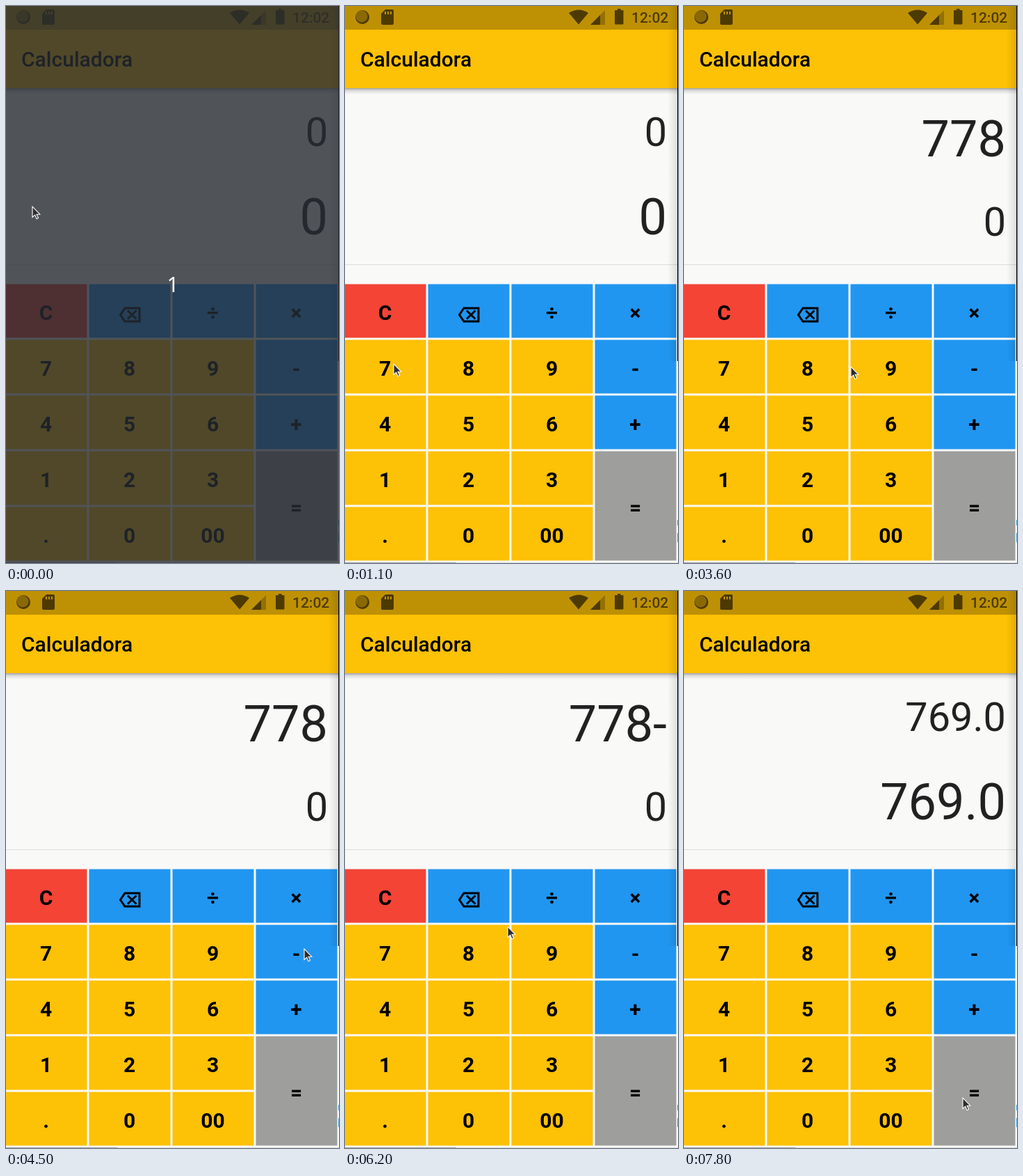
Animation, 479 px wide and 800 px high, one loop 8 s. Source, as an HTML page:

```html
<!DOCTYPE html>
<html lang="pt">
<head>
<meta charset="utf-8">
<title>Calculadora</title>
<style>
  html, body { margin: 0; width: 100%; height: 100%; overflow: hidden; background: #f9f9f8; }
  svg { display: block; width: 479px; height: 800px; }
  text { font-family: Roboto, "Liberation Sans", sans-serif; }
  .key { font-size: 30px; font-weight: 700; text-anchor: middle; }
  .num { fill: #212121; text-anchor: end; }
  .count { font: 30px "Noto Sans", sans-serif; fill: #fff; text-anchor: middle; }
  #veil { animation: veil 8s step-end infinite; }
  @keyframes veil { 0% { visibility: visible; } 1.25%, 100% { visibility: hidden; } }
</style>
</head>
<body>
<svg viewBox="0 0 479 800">
  <defs>
    <linearGradient id="barShade" x2="0" y2="1">
      <stop offset="0" stop-opacity=".34"/>
      <stop offset=".4" stop-opacity=".12"/>
      <stop offset="1" stop-opacity="0"/>
    </linearGradient>
    <linearGradient id="sideShade">
      <stop offset="0" stop-opacity="0"/>
      <stop offset="1" stop-opacity=".11"/>
    </linearGradient>
    <clipPath id="keyClip"><rect id="clipBox" width="117" height="77"/></clipPath>
  </defs>

  <rect width="479" height="800" fill="#f9f9f8"/>
  <rect y="118" width="478" height="9" fill="url(#barShade)"/>
  <rect width="478" height="118" fill="#fdc105"/>
  <rect width="478" height="34" fill="#be9104"/>

  <g fill="#4d3a02">
    <circle cx="25" cy="16" r="10"/>
    <circle cx="24" cy="15" r="8.500" fill="#8a6903"/>
    <path d="M58 5h10q2 0 2 2v18q0 2-2 2H54q-2 0-2-2V11z"/>
    <path d="M58 8v4M62 8v4M66 8v4" stroke="#be9104" stroke-width="2"/>
    <path d="M322 10Q336 1 350 10L336 26.500z"/>
    <path d="M353 27L374 6V27z" opacity=".38"/>
    <path d="M353 27L367 13V27z"/>
    <path d="M391.500 4h5v2h3q1 0 1 1V25q0 1.500-1.500 1.500h-9.500q-1.500 0-1.500-1.500V7q0-1 1-1h3.500z"/>
    <text x="412" y="24" font-size="21" font-weight="500">12:02</text>
  </g>

  <text x="22" y="87" font-size="30" font-weight="500">Calculadora</text>
  <text id="top" class="num" x="463"></text>
  <text id="low" class="num" x="463"></text>
  <path d="M0 371.500H478" stroke="#dcdcdb"/>

  <g id="keys"></g>
  <circle id="ripple" opacity=".13" clip-path="url(#keyClip)"/>
  <path d="M164.500 443.500L171 434H192V453H171z M175 437.500L187.500 449.500M187.500 437.500L175 449.500"
        fill="none" stroke="#000" stroke-width="3"/>

  <rect x="464" width="14" height="510" fill="url(#sideShade)"/>
  <rect x="478" width="1" height="510"/>
  <path d="M478.500 738v8M478.500 757v13" stroke="#4a9fd0"/>
  <path d="M0 799.500H160" stroke="#a5a5a5"/>
  <path d="M160 799.500H479" stroke="#dedede"/>

  <g id="veil">
    <rect width="479" height="800" fill="#262b32" opacity=".8"/>
    <text class="count" x="240" y="411">1</text>
  </g>

  <path id="cursor" d="M0 1V16.500L3.700 13.200L6.100 18.700L8.500 17.600L6.100 12.200H10.800z"
        fill="#2d2d2f" stroke="#fff" stroke-width="1.100"/>
</svg>

<script>
const LOOP = 8000, STEP = 100;
const $ = id => document.getElementById(id);

const YELLOW = '#fdc105', BLUE = '#2196f0', RED = '#f34436', GREY = '#9e9e9d';
const rows = ['C ÷×', '789-', '456+', '123='].map(r => [...r]);
rows.push(['.', '0', '00']);

const keyLeft = col => col * 120 - .5;
const keyTop = row => row * 80 + 399.5;

function keyColor(label, col) {
  if (label === 'C') return RED;
  if (label === '=') return GREY;
  return col === 3 || '÷ '.includes(label) ? BLUE : YELLOW;
}

$('keys').innerHTML = rows.map((row, r) => row.map((label, c) => {
  const height = label === '=' ? 157 : 77;
  return `<rect x="${keyLeft(c)}" y="${keyTop(r)}" width="117" height="${height}" fill="${keyColor(label, c)}"/>` +
    `<text class="key" x="${keyLeft(c) + 58}" y="${keyTop(r) + height / 2 + 13}">${label}</text>`;
}).join('')).join('');

// Pointer hops: start, end, and where the tip comes to rest
const home = { x: 38, y: 287 };
const hops = [
  [500, 700, 83, 476],
  [900, 1100, 70, 513],
  [1700, 1900, 76, 513],
  [2700, 3100, 196, 522],
  [3600, 3700, 284, 511],
  [3900, 4500, 429, 513],
  [5800, 6000, 249, 471],
  [6200, 6300, 218, 491],
  [6400, 6500, 273, 515],
  [6900, 7000, 342, 646],
  [7200, 7600, 401, 727]
];

// Key presses: time, label, how long the ripple shows
const presses = [
  [2100, '7', 100], [2200, '7', 0], [3300, '8', 100],
  [5300, '-', 300], [6700, '9', 200], [7800, '=', 0]
];

const smooth = p => p * p * (3 - 2 * p);

function pointer(t) {
  let { x, y } = home;
  for (const [start, end, toX, toY] of hops) {
    if (t < start) break;
    const p = smooth(Math.min(1, (t - start + STEP) / (end - start + STEP)));
    x += (toX - x) * p;
    y += (toY - y) * p;
  }
  return { x, y };
}

function display(t) {
  const typed = presses.filter(([at]) => at <= t).map(([, label]) => label).join('');
  if (!typed.endsWith('=')) return { expr: typed || '0', result: '0', typing: typed !== '' };
  const [a, b] = typed.slice(0, -1).split('-');
  const result = (a - b).toFixed(1);
  return { expr: result, result, typing: false };
}

function set(el, attrs) {
  for (const name in attrs) el.setAttribute(name, attrs[name]);
}

function drawNumber(el, text, big, y) {
  el.textContent = text;
  set(el, { 'font-size': big ? 72 : 57.6, y });
}

function drawRipple(t, { x, y }) {
  const press = presses.find(([at, , hold]) => t >= at && t < at + hold);
  if (!press) return set($('ripple'), { r: 0 });
  const [at, label] = press;
  const row = rows.findIndex(r => r.includes(label));
  set($('clipBox'), { x: keyLeft(rows[row].indexOf(label)), y: keyTop(row) });
  set($('ripple'), { cx: x, cy: y, r: 23 + (t - at) * .35 });
}

function draw(t) {
  const tip = pointer(t);
  set($('cursor'), { transform: `translate(${Math.round(tip.x)} ${Math.round(tip.y)})` });
  drawRipple(t, tip);

  const { expr, result, typing } = display(t);
  drawNumber($('top'), expr, typing, typing ? 216 : 201);
  drawNumber($('low'), result, !typing, typing ? 330 : 328);
}

const begin = performance.now();
function tick() {
  const t = (performance.now() - begin) % LOOP;
  draw(Math.floor(t / STEP) * STEP);
  requestAnimationFrame(tick);
}
tick();
</script>
</body>
</html>
```
